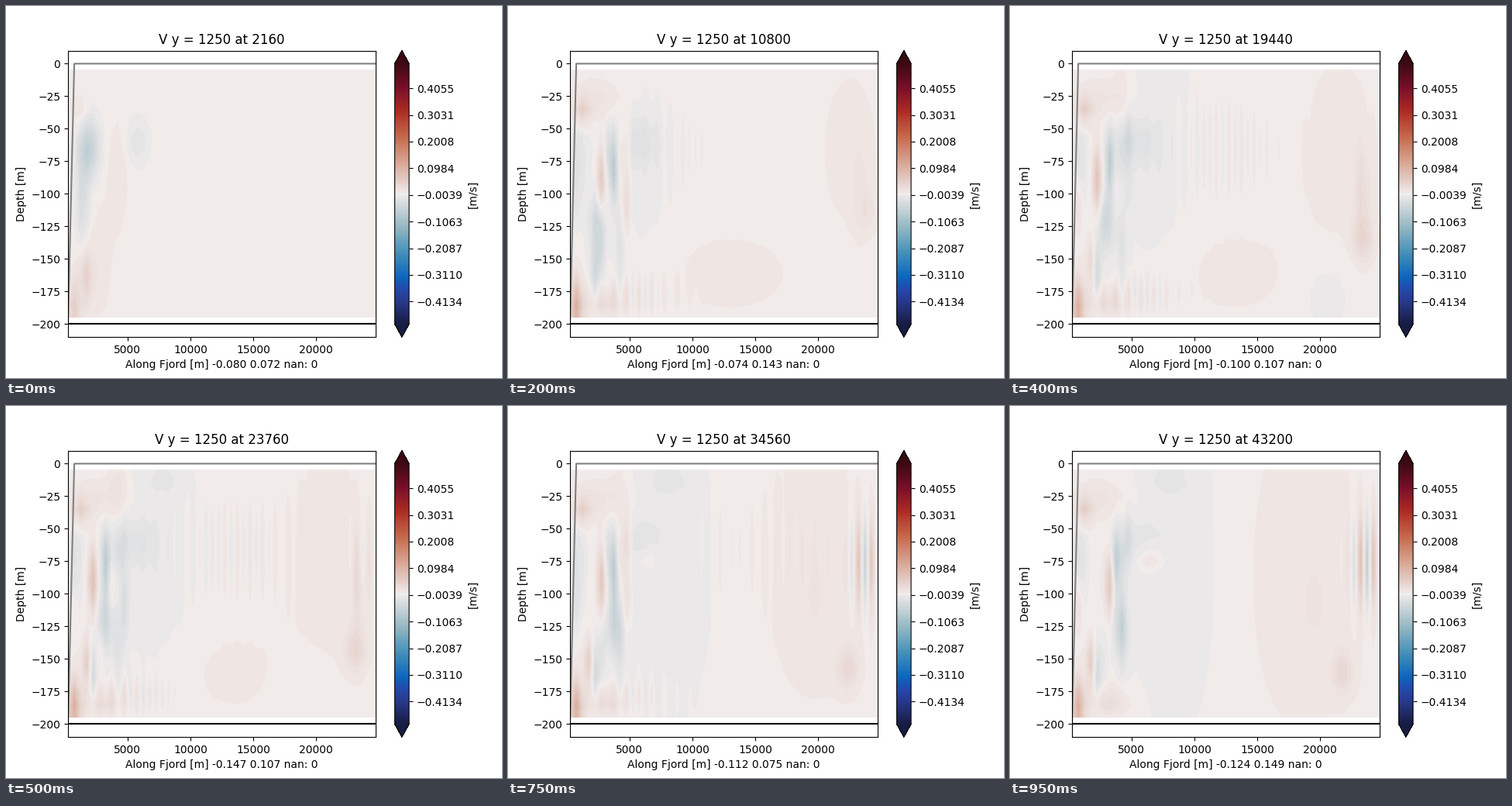
A matplotlib script that plays this animation: 640x480 px, repeating every 1 s.

```python
import numpy as np
import matplotlib.pyplot as plt
from matplotlib.animation import FuncAnimation
from matplotlib.colors import LinearSegmentedColormap

FRAMES, INTERVAL, STEP = 20, 50, 2160

x = np.arange(250, 25000, 500)
depth = np.arange(-195, 0, 10)
X, Z = np.meshgrid(x / 1000, depth)
levels = np.linspace(-0.5, 0.5, 128)
ripple = np.cos(2 * np.pi * (X - 0.75))  # alternates from column to column

cold = ["#171c42", "#293a8f", "#2349ae", "#0b66bd", "#4590b9", "#8eb5c2", "#d2d8db"]
warm = ["#e6d2cc", "#d59d89", "#c46548", "#ac2b24", "#780e28", "#3c0911"]
stops = np.array([0, 1, 1.5, 2, 3, 4, 5, 5.5, 6, 7, 8, 9, 10, 11]) / 11
balance = LinearSegmentedColormap.from_list(
    "balance", list(zip(stops, cold + ["#f1eceb"] + warm)))


def blob(cx, cz, sx, sz, amp):
    """Eddy centred at cx [km], cz [m], with the given half widths."""
    return amp * np.exp(-((X - cx) / sx) ** 2 - ((Z - cz) / sz) ** 2)


def ramp(t, start, end):
    s = np.clip((t - start) / (end - start), 0, 1)
    return s * s * (3 - 2 * s)


def pulse(t, centre, width):
    return np.exp(-((t - centre) / width) ** 2)


def first_plume(t):
    fade = np.exp(-14 * t)
    return (blob(1.9, -65, 0.8, 22, -0.07 * fade)
            + blob(1.4, -105, 0.5, 35, -0.04 * fade)
            + blob(4.2, -85, 0.7, 40, 0.012 * fade)
            + blob(1.7, -163, 0.5, 22, 0.045 * fade)
            + blob(2.8, -150, 1, 50, 0.008 * fade))


def head_jets(t):
    on = ramp(t, 0, 0.1)
    swing = np.cos(2 * np.pi * t)
    late = ramp(t, 0.3, 0.5)
    return (blob(3.5 + 0.25 * swing, -76, 0.42, 24, -0.08 * on)
            + blob(2.75 + 0.5 * swing, -90, 0.35, 25, 0.075 * on)
            + blob(2 + 2.2 * t, -122, 0.6, 22, -0.055 * on)
            + blob(2.25, -160, 0.4, 22, -0.05 * on)
            + blob(0.9, -75, 0.5, 35, -0.025 * on)
            + blob(1.75, -153, 0.35, 18, 0.06 * late)
            + blob(4.25, -140, 0.4, 25, -0.025 * on))


def shallow_inflow(t):
    on = ramp(t, 0, 0.1)
    return (blob(1.2, -36, 0.6, 10, 0.02 + 0.03 * on)
            + blob(2.5, -28, 2, 14, 0.016 * on)
            + blob(4.2, -18, 0.7, 22, 0.02 * pulse(t, 0.6, 0.2)))


def bottom_inflow(t):
    on = ramp(t, 0, 0.1)
    return (blob(0.75, -188, 0.45, 22, 0.05 + 0.05 * on)
            + blob(3, -183, 1.6, 11, 0.03 * on)
            + ripple * blob(5.5, -177, 2.6, 13, 0.022 * on * (1 - ramp(t, 0.7, 1)))
            + blob(13, -161, 6.5, 40, 0.006 * on * (1 - ramp(t, 0.5, 0.7))))


def interior(t):
    """Weak return flow that widens down the fjord, with a short wave train."""
    wide = ramp(t, 0, 1)
    waves = ramp(t, 0.1, 0.3) * (1 - ramp(t, 0.65, 0.95))
    return (blob(5.8, -60, 0.9 + 0.7 * ramp(t, 0, 0.1), 17, -0.02 + 0.008 * wide)
            + blob(5.5 + 3 * wide, -80, 2.4 + 1.8 * wide, 60 + 90 * wide,
                   -0.009 * ramp(t, 0, 0.1))
            + blob(8, -12, 1.8, 12, -0.01 * ramp(t, 0.3, 0.5))
            + blob(6.5, -73, 1, 9, 0.024 * ramp(t, 0.55, 1))
            + ripple * blob(6 + 14 * t, -65, 2 + 6 * t, 36, 0.011 * waves)
            + blob(26 - 13 * t, -175, 2.4, 36, -0.009 * pulse(t, 0.42, 0.17)))


def mouth(t):
    """Sinking core, broad inflow and alternating jets at the open end."""
    on = ramp(t, 0.1, 0.35)
    jets = ramp(t, 0.35, 0.9)
    return (blob(24.6 - 2.8 * t, -160 + 75 * (1 - t) ** 2, 0.8, 15, 0.034 * on)
            + blob(23.6 - 5 * t, -60 - 25 * t, 1.4 + 3.6 * t, 40 + 90 * t,
                   0.009 * ramp(t, 0, 0.15))
            + blob(23.4, -100, 0.6, 35, 0.024 * on * (1 - jets))
            + blob(20.2 - 0.6 * t, -65 - 42 * t, 0.6, 20, 0.01 * jets)
            - ripple * blob(23.7, -75, 1.1, 33, 0.085 * jets))


rng = np.random.default_rng(4)
columns = rng.integers(1, 10, 8) * 0.5 + 0.25
heights = rng.uniform(-165, -45, 8)
phases = rng.uniform(0, 2 * np.pi, 8)


def small_eddies(t):
    return sum(blob(c, h, 0.3, 20, 0.025 * ramp(t, 0, 0.15) * np.sin(10 * t + p))
               for c, h, p in zip(columns, heights, phases))


def velocity(t):
    parts = (first_plume, head_jets, shallow_inflow, bottom_inflow,
             interior, mouth, small_eddies)
    return sum(part(t) for part in parts)


# Extremes quoted in the axis label, interpolated between a few key frames
keys = [0, 2, 6, 10, 12, 15, 19]
lows = [-.080, -.096, -.053, -.147, -.082, -.112, -.124]
highs = [.072, .179, .107, .107, .132, .075, .149]


def contours(i):
    return ax.contourf(x, depth, velocity(i / (FRAMES - 1)), levels,
                       cmap=balance, extend="both")


fig, ax = plt.subplots(figsize=(6.4, 4.8), dpi=100)
shown = [contours(0)]
fig.colorbar(shown[0], ax=ax, label="[m/s]")
ax.plot([250, 750, 24750], [-200, 0, 0], color="gray")
ax.plot([250, 24750], [-200, -200], color="black")
ax.set(xlim=(250, 24750), ylim=(-210, 10), ylabel="Depth [m]")


def update(i):
    shown[0].remove()
    shown[0] = contours(i)
    low, high = np.interp(i, keys, lows), np.interp(i, keys, highs)
    ax.set_title(f"V y = 1250 at {(i + 1) * STEP}")
    ax.set_xlabel(f"Along Fjord [m] {low:.3f} {high:.3f} nan: 0")


anim = FuncAnimation(fig, update, frames=FRAMES, interval=INTERVAL,
                     init_func=lambda: update(0), repeat=True)
plt.show()
```
